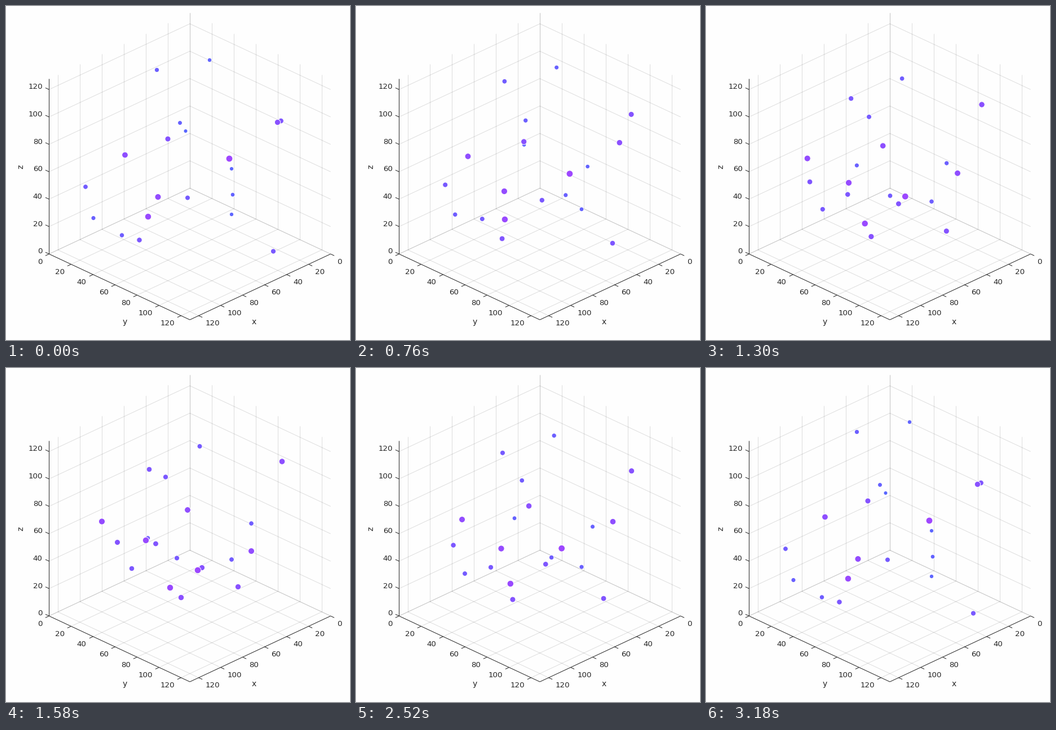
A matplotlib script for the animation above (3200 ms loop, 610x593 px).

```python
import numpy as np
import matplotlib.pyplot as plt
from matplotlib.animation import FuncAnimation
from matplotlib.collections import LineCollection

W, H, DPI = 610, 593, 64
PX = 72 / DPI              # points per pixel
LIM = 128
TICKS = range(0, 121, 20)
INK = "#262626"
HOLD, MOVE = 20, 59        # frames at rest, frames in motion
FRAMES = 160

# The two scattered clouds as screen points, farthest dot first
START = np.array([
    (318.5, 222), (400, 289), (400, 370), (361, 96), (402, 335),
    (308.5, 207.5), (155, 376.5), (267.5, 113.5), (205.5, 407), (141, 321),
    (322, 340.5), (474, 435.5), (236.5, 415.5), (487.5, 204), (287, 236),
    (481.5, 206.5), (211, 264.5), (269.5, 339), (252, 374), (396, 271)])
END = np.array([
    (251.5, 302), (435, 276), (400, 340), (343.5, 139), (303, 337.5),
    (283, 193.5), (223, 356), (254, 180), (265.5, 312), (197.5, 309.5),
    (347.5, 354.5), (411.5, 388.5), (310.5, 407.5), (489.5, 166), (322, 252),
    (435, 325), (170, 272.5), (248, 306), (291, 390), (340, 359)])

# Dots grow towards the viewer, and their colour follows their diameter
near = np.linspace(0, 1, len(START))
START_SIZE = 6.1 + 3.2 * near + 1.6 * near ** 3
END_SIZE = 7.5 + 3.2 * near
BLUE = np.array([88, 104, 255]) / 255
PURPLE = np.array([160, 70, 255]) / 255


def mix(a, b, t):
    return a + (b - a) * t


def project(x, y, z):
    return (326 + (y - x) * 249.6 / LIM,
            323.5 + (x + y) * 116.8 / LIM - z * 2.433)


def segment(a, b):
    return [project(*a), project(*b)]


def grid_lines():
    """Both line families on each of the three back planes."""
    lines = []
    for a in range(3):
        for b in range(3):
            if a == b:
                continue
            for t in TICKS:
                p, q = [0, 0, 0], [0, 0, 0]
                p[a] = q[a] = t
                q[b] = LIM
                lines.append(segment(p, q))
    return lines


def add_axis(end, at, tick, label, align):
    """Axis line up to its end, with ticks and numbers offset from it."""
    lines = [segment(at(0), end)]
    for t in TICKS:
        px, py = project(*at(t))
        lines.append([(px, py), (px + tick[0], py + tick[1])])
        ax.text(px + label[0], py + label[1], str(t), ha=align,
                va="baseline", size=13.33 * PX, color=INK)
    ax.add_collection(LineCollection(lines, colors=INK, linewidths=PX))


plt.rcParams["font.family"] = "DejaVu Sans"
fig = plt.figure(figsize=(W / DPI, H / DPI), dpi=DPI, facecolor="#fefefe")
ax = fig.add_axes([0, 0, 1, 1])
ax.set(xlim=(0, W), ylim=(H, 0))
ax.axis("off")

ax.add_collection(LineCollection(grid_lines(), colors=[(0.15, 0.15, 0.15, 0.15)],
                                 linewidths=PX))
add_axis((LIM, LIM, 0), lambda t: (t, LIM, 0), (6.5, 3), (11.5, 17.4), "left")
add_axis((LIM, LIM, 0), lambda t: (LIM, t, 0), (-6.5, 3), (-11.7, 17.4), "right")
add_axis((LIM, 0, LIM), lambda t: (LIM, 0, t), (-6.5, -3), (-11.7, -1.1), "right")
for name, x, y, turn in (("x", 439.5, 561, 0), ("y", 211, 561, 0), ("z", 26, 285.5, 90)):
    ax.text(x, y, name, ha="center", va="center", rotation=turn,
            size=14 * PX, color=INK)

dots = ax.scatter(*START.T, edgecolors="white", linewidths=PX, zorder=5)


def update(i):
    back, step = divmod(i, FRAMES // 2)
    t = max(0, step - HOLD) / MOVE
    if back:
        t = 1 - t
    size = mix(START_SIZE, END_SIZE, t)
    dots.set_offsets(mix(START, END, t))
    dots.set_sizes(((size + 1) * PX) ** 2)
    dots.set_facecolor(mix(BLUE, PURPLE, np.clip((size - 6) / 5, 0, 1)[:, None]))
    return [dots]


anim = FuncAnimation(fig, update, frames=FRAMES, interval=20,
                     repeat=True, repeat_delay=0)
plt.show()
```
